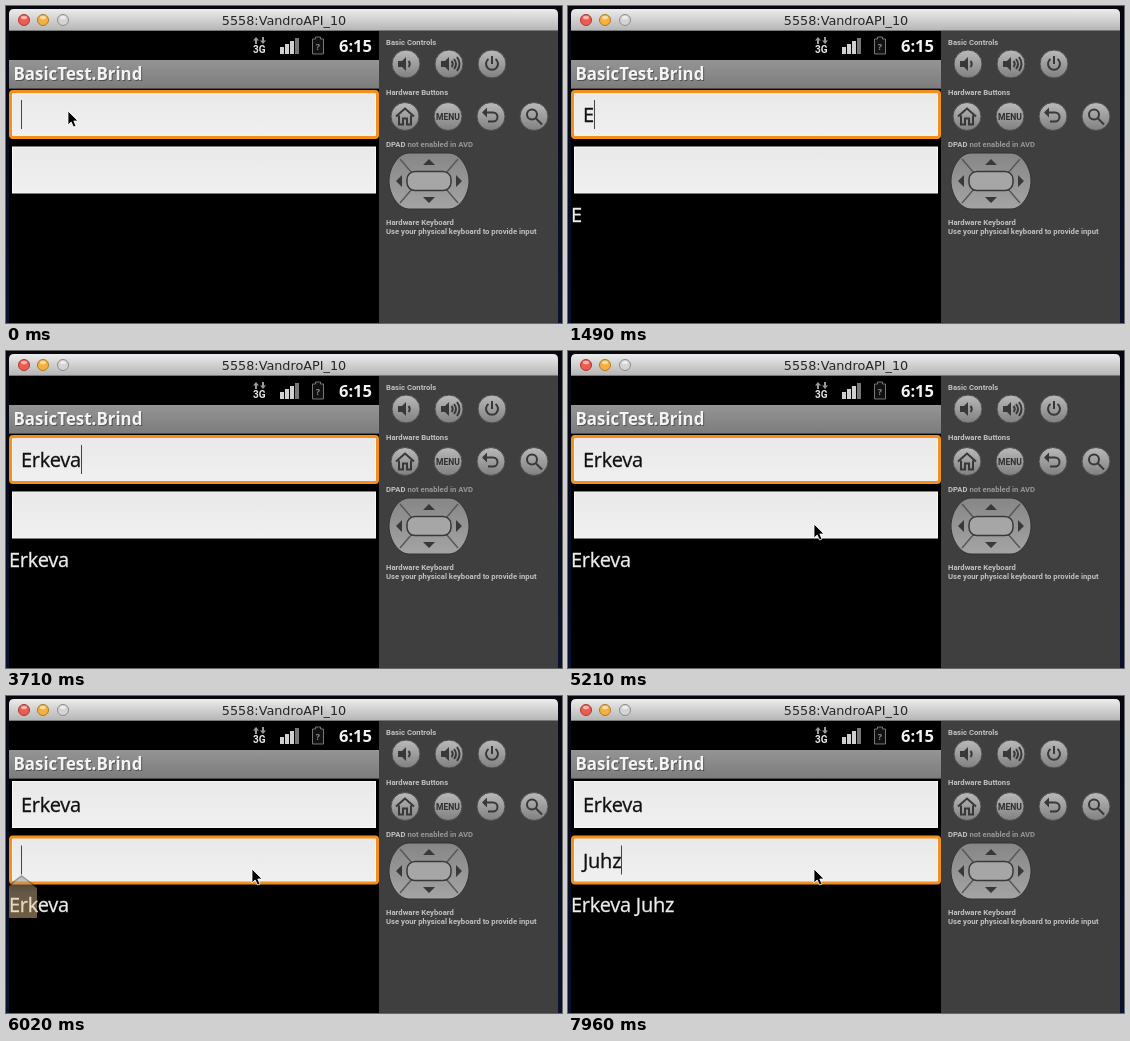
An HTML page for the animation above (8000 ms loop, 556x317 px).

```html
<!DOCTYPE html>
<html lang="en">
<head>
<meta charset="utf-8">
<title>Emulator typing demo</title>
<style>
  html, body { margin: 0; width: 100%; height: 100%; overflow: hidden; background: #070b1c; }
  svg { display: block; }
  .ui { font-family: "Open Sans", "Noto Sans", sans-serif; }
  .entry { font-size: 20px; letter-spacing: -.25px; white-space: pre; stroke-width: .3; }
  .small { font: bold 7.7px Roboto, "Liberation Sans", sans-serif; fill: #c0c0c0; }
  .icon { fill: none; stroke: #383838; stroke-width: 2; }
  .solid { fill: #383838; stroke: none; }
</style>
</head>
<body>
<svg width="556" height="317" viewBox="0 0 556 317">
  <defs>
    <linearGradient id="desk" x2="0" y2="1">
      <stop stop-color="#06070f"/><stop offset="1" stop-color="#0a1230"/>
    </linearGradient>
    <linearGradient id="chrome" x2="0" y2="1">
      <stop stop-color="#ececec"/><stop offset="1" stop-color="#b4b4b4"/>
    </linearGradient>
    <linearGradient id="bar" x2="0" y2="1">
      <stop stop-color="#949494"/><stop offset="1" stop-color="#7c7c7c"/>
    </linearGradient>
    <linearGradient id="key" x2="0" y2="1">
      <stop stop-color="#bababa"/><stop offset="1" stop-color="#808080"/>
    </linearGradient>
    <linearGradient id="pad" x2="0" y2="1">
      <stop stop-color="#868686"/><stop offset="1" stop-color="#a4a4a4"/>
    </linearGradient>
    <linearGradient id="paper" x2="0" y2="1">
      <stop stop-color="#e9e9e9"/><stop offset="1" stop-color="#f0f0f0"/>
    </linearGradient>
    <linearGradient id="amber" x2="0" y2="1">
      <stop stop-color="#8a7a60"/><stop offset=".4" stop-color="#e0c098"/><stop offset="1" stop-color="#f0c890"/>
    </linearGradient>
    <clipPath id="screen"><rect x="3" y="25" width="370" height="292"/></clipPath>
  </defs>

  <rect width="556" height="317" fill="url(#desk)"/>
  <path d="M3 25V8q0-5 5-5H547q5 0 5 5V25z" fill="url(#chrome)"/>
  <path d="M3 24.5H552" stroke="#777"/>
  <g id="lights"></g>
  <text x="278" y="18.500" text-anchor="middle" font-family="DejaVu Sans, sans-serif" font-size="12.8" fill="#262626">5558:VandroAPI_10</text>

  <rect x="3" y="25" width="370" height="292"/>
  <rect x="373" y="25" width="179" height="292" fill="#3f3f3f"/>

  <!-- status bar -->
  <g fill="#d0d0d0">
    <path d="M250 31l3 3.500h-2V38h-2v-3.500h-2zM257 38l-3-3.500h2V31h2v3.500h2z" fill="#999"/>
    <text x="247" y="47" font-family="Roboto, sans-serif" font-weight="bold" font-size="10" fill="#e6e6e6">3G</text>
    <path d="M274 41h4v7h-4zM279 38h4v10h-4zM284 35h4v13h-4z"/>
    <path d="M289 32h4v16h-4z" fill="#777"/>
  </g>
  <path d="M309.500 33V31h5v2h3v15h-11V33z" fill="#111" stroke="#777"/>
  <text x="312" y="44" text-anchor="middle" class="ui" font-size="9" font-weight="bold" fill="#888">?</text>
  <text x="333" y="46" class="ui" font-size="16.500" font-weight="bold" fill="#f2f2f2">6:15</text>

  <!-- app title -->
  <rect x="3" y="54" width="370" height="29" fill="url(#bar)"/>
  <path d="M3 82.500H373" stroke="#4c4c4c"/>
  <g class="ui" font-size="16.900" font-weight="bold">
    <text x="8.500" y="75" fill="#333" opacity=".6">BasicTest.Brind</text>
    <text x="7.500" y="74" fill="#f4f4f4">BasicTest.Brind</text>
  </g>

  <g id="fields" class="ui"></g>
  <text id="label" x="3" y="216.300" class="ui entry" fill="#ececec" stroke="#ececec"></text>
  <g id="handle" clip-path="url(#screen)">
    <path d="M15.500 180L31 191.500V222H1V191z" fill="url(#amber)"/>
    <path d="M1 191L15.500 180L31 191.500" fill="none" stroke="#333" stroke-width="1.500"/>
  </g>
  <path id="tip" d="M15 178L21.500 170L27.500 178z" fill="#eee" stroke="#666"/>

  <!-- hardware panel -->
  <g class="small">
    <text x="380" y="39">Basic Controls</text>
    <text x="380" y="88.500">Hardware Buttons</text>
    <text x="380" y="141">DPAD <tspan fill="#979797">not enabled in AVD</tspan></text>
    <text x="380" y="218.700">Hardware Keyboard</text>
    <text x="380" y="227.700">Use your physical keyboard to provide input</text>
  </g>
  <g id="keys"></g>

  <g transform="translate(423 175)">
    <path d="M-20-28H20C31-28 40-13 40 0S31 28 20 28H-20C-31 28-40 13-40 0S-31-28-20-28z" fill="url(#pad)" stroke="#333"/>
    <path d="M-29-22L-17-8M29-22L17-8M-29 22L-17 8M29 22L17 8" stroke="#585858" stroke-width="1.500"/>
    <rect x="-22" y="-9.500" width="44" height="19" rx="8" fill="#a6a6a6" stroke="#383838" stroke-width="1.500"/>
    <path class="solid" d="M0-22l6 6h-12zM0 22l6-6h-12zM-33 0l6-6v12zM33 0l-6-6v12z"/>
  </g>

  <path id="mouse" d="M0 0V14L3.200 11L5.500 16L8 15L5.800 10H10z" fill="#000" stroke="#fff" stroke-width=".8"/>
</svg>

<script>
const LOOP = 8000;
const FIRST = "Erkeva", LAST = "Juhz";
const $ = id => document.getElementById(id);
const show = (el, on) => el.setAttribute("visibility", on ? "visible" : "hidden");

$("lights").innerHTML = [[18, "#ee5b50", "#a93a32"], [37, "#f5b13d", "#b0792a"], [57, "#d4d4d4", "#8c8c8c"]]
  .map(([x, fill, edge]) =>
    `<circle cx="${x}" cy="14" r="5.500" fill="${fill}" stroke="${edge}"/>
     <ellipse cx="${x}" cy="11.500" rx="3" ry="1.800" fill="#fff" opacity=".55"/>`).join("");

const speaker = '<path class="solid" d="M-8-3h4l4-4V7l-4-4h-4z"/><path class="icon" d="M2.500-3q2.500 3 0 6"/>';
const keys = [
  [400, 58, speaker],
  [443, 58, speaker + '<path class="icon" d="M5-5q4 5 0 10M8-7q5 7 0 14"/>'],
  [486, 58, '<path class="icon" d="M-3.500-5a6 6 0 1 0 7 0M0-8V0"/>'],
  [399, 110.5, '<path class="icon" d="M-9 0L0-8L9 0M-6-1V8H-2V2H2V8H6V-1"/>'],
  [442, 110.5, '<text y="3" text-anchor="middle" font-family="Roboto, sans-serif" font-size="8.500" font-weight="bold" fill="#303030">MENU</text>'],
  [485, 110.5, '<path class="icon" d="M-6-4H2a4.500 4.500 0 0 1 0 9H-3"/><path class="solid" d="M-9-4l5-5V1z"/>'],
  [528, 110.5, '<circle class="icon" cx="-2" cy="-2" r="5"/><path class="icon" d="M2 2L8 8"/>']
];
$("keys").innerHTML = keys.map(([x, y, icon]) =>
  `<g transform="translate(${x} ${y})"><circle r="14" fill="url(#key)" stroke="#4c4c4c"/>${icon}</g>`).join("");

// Each field has an orange focus ring, its text and a caret.
function makeField(top) {
  const g = document.createElementNS("http://www.w3.org/2000/svg", "g");
  g.innerHTML = `
    <rect x="6.500" y="${top + .5}" width="363" height="46" fill="url(#paper)" stroke="#f8f8f8"/>
    <rect x="4.500" y="${top + .5}" width="367" height="46" rx="2.500" fill="none" stroke="#f58f1c" stroke-width="3"/>
    <text class="entry" x="15" y="${top + 31.3}" fill="#111" stroke="#111"></text>
    <rect y="${top + 9}" width="1" height="29" fill="#444"/>`;
  $("fields").append(g);
  const [, ring, text, caret] = g.children;
  return (value, focus, blink) => {
    if (text.textContent !== value) text.textContent = value;
    show(ring, focus);
    show(caret, focus && blink);
    caret.setAttribute("x", 15 + Math.round(value ? text.getComputedTextLength() : 0));
  };
}
const nameField = makeField(85), surnameField = makeField(140.5);

const firstKeys = [1340, 1930, 2530, 2820, 3420, 3710];
const lastKeys = [7220, 7510, 7660, 7960];
const caretFlips = [150, 600, 1190, 1340, 1780, 1930, 2380, 2530, 3270, 3420,
  4160, 4610, 5060, 5660, 6620, 7220];
const mousePath = [[0, 62, 105], [150, 117, 200], [300], [4760, 339, 228],
  [4910, 292, 201], [5060, 258, 180], [5210, 246, 173]];
const passed = (times, t) => times.filter(at => at <= t).length;

function draw(t) {
  const first = FIRST.slice(0, passed(firstKeys, t));
  const last = LAST.slice(0, passed(lastKeys, t));
  const blink = passed(caretFlips, t) % 2 === 0;
  const second = t >= 5870;
  nameField(first, !second, blink);
  surnameField(last, second, blink);

  $("label").textContent = t < 1490 ? "" : last ? first + " " + last : first;

  show($("handle"), t >= 6020 && t < 7370);
  $("handle").setAttribute("opacity", t < 6170 ? .46 : .6);
  show($("tip"), t >= 7220 && t < 7370);

  const [, x, y] = mousePath[passed(mousePath.map(p => p[0]), t) - 1];
  show($("mouse"), x !== undefined);
  if (x !== undefined) $("mouse").setAttribute("transform", `translate(${x} ${y})`);
}

const start = performance.now();
function tick(now) {
  draw(Math.max(0, now - start) % LOOP);
  requestAnimationFrame(tick);
}
draw(0);
requestAnimationFrame(tick);
</script>
</body>
</html>
```
